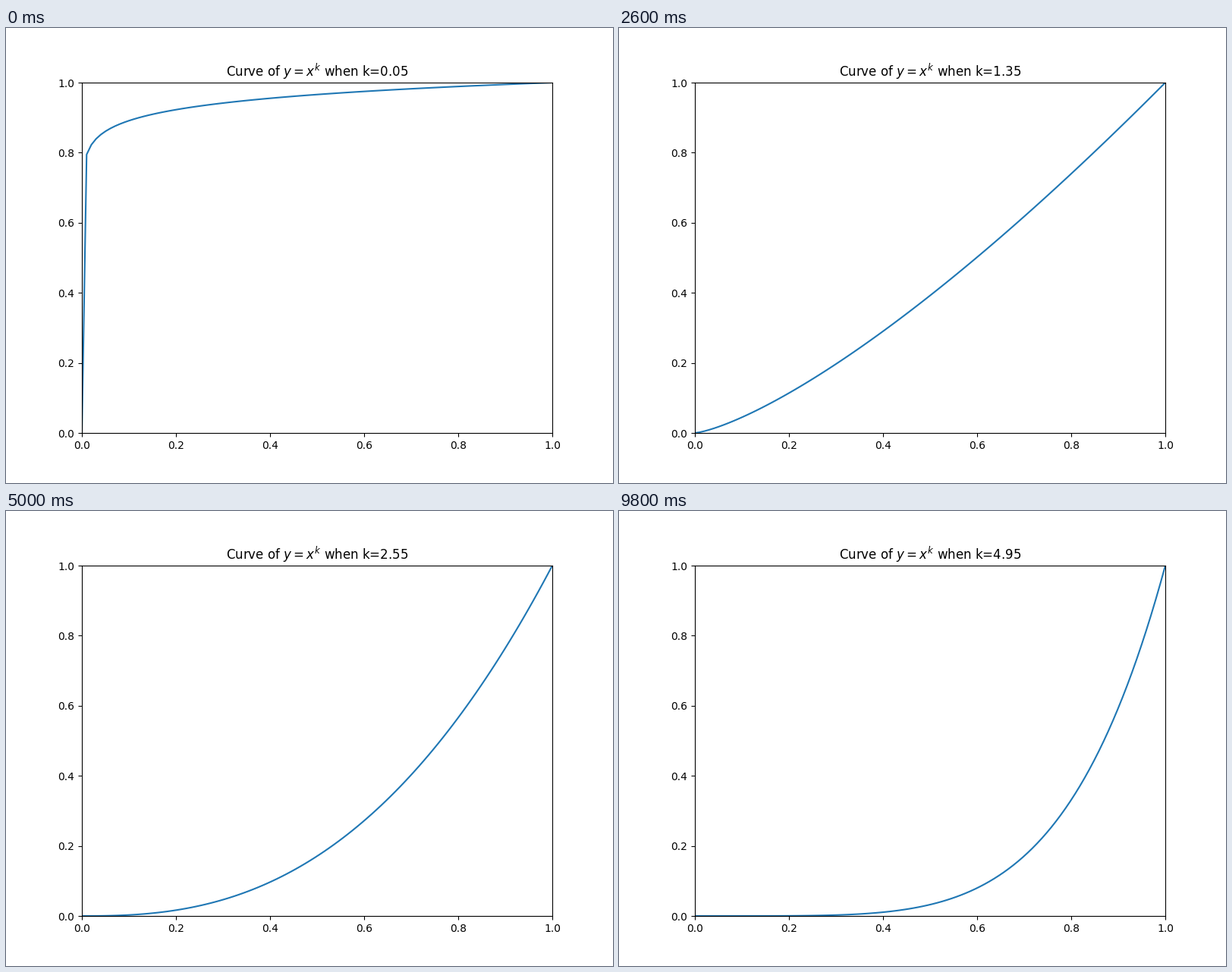
A matplotlib script for the animation above (9900 ms loop, 800 by 600 pixels).

```python
import matplotlib.pyplot as plt
import numpy as np
from matplotlib.animation import FuncAnimation

FRAMES = 99
INTERVAL = 100  # ms
K_STEP = 0.05

fig, ax = plt.subplots(figsize=(8, 6), dpi=100)
ax.set_xlim(0, 1)
ax.set_ylim(0, 1)

x = np.linspace(0, 1, 100)
line, = ax.plot([], [], color="tab:blue", lw=1.5)
title = ax.set_title("")


def update(i):
    k = K_STEP * (i + 1)
    line.set_data(x, x ** k)
    title.set_text(f"Curve of $y=x^k$ when k={k:.2f}")
    return line, title


anim = FuncAnimation(fig, update, frames=FRAMES, interval=INTERVAL,
                     repeat=True, repeat_delay=0, blit=False)
plt.show()
```
